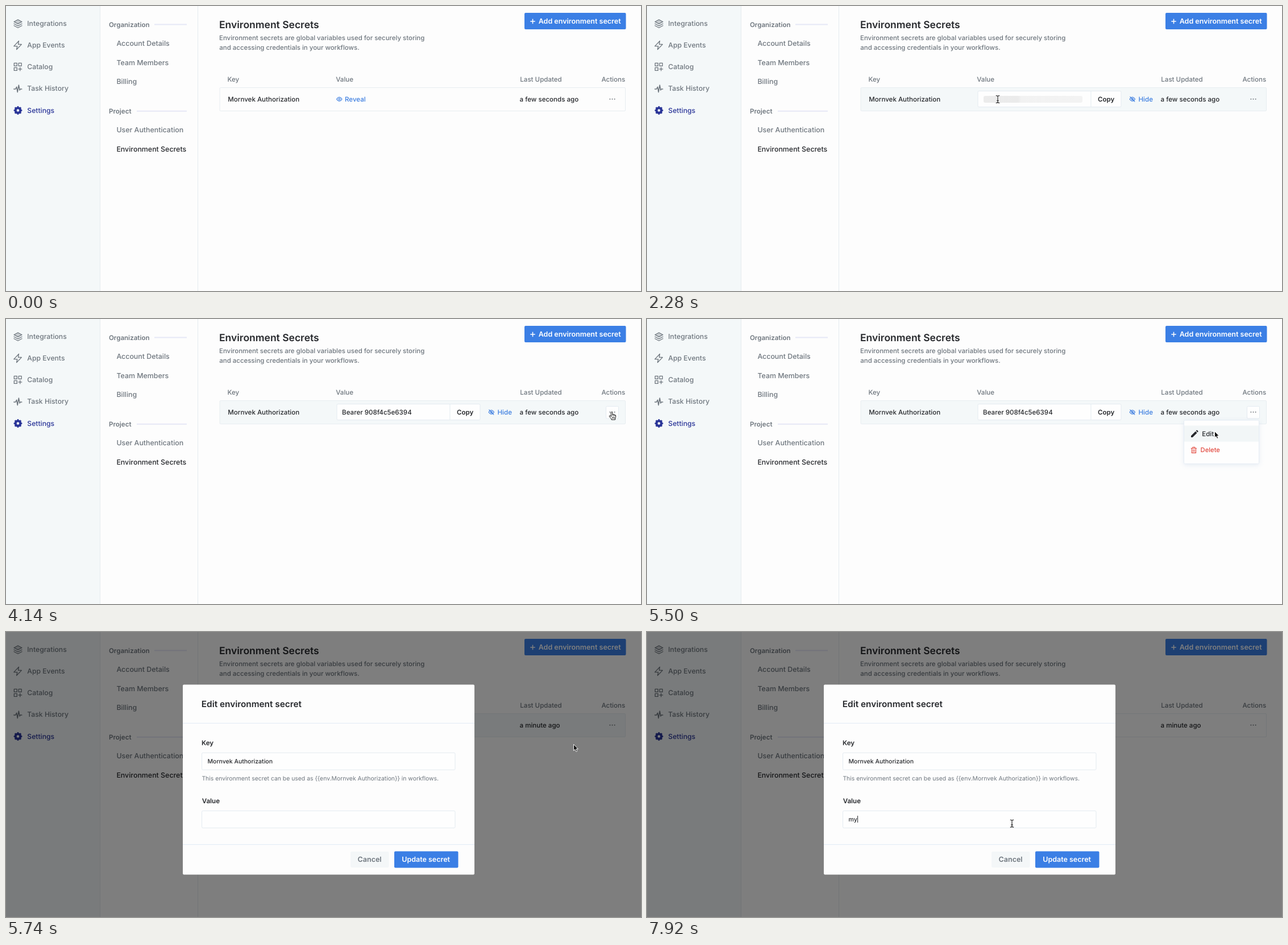
Recreate the animation shown at these times as an HTML page. Size 1117x501 px, loop 8000 ms.

```html
<!DOCTYPE html>
<html lang="en">
<head>
<meta charset="utf-8">
<title>Environment secrets</title>
<style>
  html, body { margin: 0; width: 100%; height: 100%; overflow: hidden; background: #fdfdfd; }
  svg { display: block; }
  text { font: 500 11.55px Inter, sans-serif; fill: #26282c; text-rendering: geometricPrecision; white-space: pre; }
  .side text { font-size: 12.2px; fill: #6e767e; }
  .nav text { font-size: 12.4px; fill: #6e767e; }
  .side .active { fill: #2a3598; }
  .nav .active { fill: #26282c; }
  .nav .section { font-size: 11.55px; font-weight: 600; }
  .muted text { fill: #6e767e; }
  .desc text { font-size: 11.45px; }
  .title { font-size: 17.5px; font-weight: 600; }
  .link { fill: #3b7de0; }
  .bold { font-weight: 600; }
  .button { font-size: 12.5px; font-weight: 600; fill: #fff; }
  .cancel { fill: #6e767e; }
  .danger { font-size: 11.2px; fill: #e2493f; }
  .heading { font-size: 15.35px; font-weight: 600; }
  .field { font-size: 10.5px; }
  .help { font-size: 10.4px; font-weight: 400; fill: #6e767e; }
  .icon { fill: none; stroke: #6e767e; stroke-width: 1.3; stroke-linejoin: round; stroke-linecap: round; }
  .blue { stroke: #3b7de0; stroke-width: 1.1; }
  .red { stroke: #e2493f; stroke-width: 1.1; }
  .box { fill: #fefefe; stroke: #e4ebf1; }
  .primary { fill: #3b7fe5; }
  #menu { transform-origin: 1010px 178px; }
  #menuPanel { filter: drop-shadow(0 2px 4px #b9cbe455); }
  #modal { transform-origin: 567px 259px; }
  #rowGlow { mix-blend-mode: plus-lighter; }
</style>
</head>
<body>
<svg width="1117" height="501" viewBox="0 0 1117 501">
  <defs>
    <linearGradient id="shimmer">
      <stop offset="0" stop-color="#ececec"/><stop offset=".35" stop-color="#ebebeb"/>
      <stop offset=".38" stop-color="#f2f2f2"/><stop offset="1" stop-color="#f3f3f3"/>
    </linearGradient>
    <path id="eye" d="M-4.7 0Q0 -7 4.7 0Q0 7 -4.7 0Z"/>
    <path id="beamShape" d="M-2.8 -6.4Q0 -6.4 0 -4.8V4.8Q0 6.4 -2.8 6.4M2.8 -6.4Q0 -6.4 0 -4.8M0 4.8Q0 6.4 2.8 6.4M-1.5 2.3H1.5"/>
  </defs>

  <rect width="1117" height="501" fill="#fdfdfd"/>
  <rect width="165" height="501" fill="#f4f8f9"/>
  <path d="M165.5 0V501M337.5 0V501" stroke="#e5ebef"/>

  <g class="side">
    <g class="icon">
      <path d="M21 24L28 27.7L21 31.4L14 27.7Z" fill="#c9ced2"/>
      <path d="M14 31.2L21 34.9L28 31.2M14 34.5L21 38.2L28 34.5"/>
      <path d="M22.5 61.5L13.8 70.6H19.8L18.6 76.5L27.4 67.4H21.5Z"/>
      <path d="M14.3 100.3h5v5h-5zM22.2 100.3h5v5h-5zM14.3 108.4h5v5h-5zM24.8 108v5.8M21.9 110.9h5.8"/>
      <path d="M13.8 146H16.8L18.7 142.2L20.2 151.5L22.4 139L24.1 148L25.2 146H27.8" stroke-width="1.5"/>
    </g>
    <g fill="none" stroke="#2a3598">
      <circle cx="21" cy="183.5" r="4.3" stroke-width="4"/>
      <circle cx="21" cy="183.5" r="6.3" stroke-width="2.2" pathLength="16" stroke-dasharray="1" stroke-dashoffset=".5"/>
    </g>
    <text x="37.3" y="35.4">Integrations</text>
    <text x="37.3" y="73.4">App Events</text>
    <text x="37.3" y="111.4">Catalog</text>
    <text x="37.3" y="149.4">Task History</text>
    <text x="37.3" y="187.6" class="active">Settings</text>
  </g>

  <g class="nav">
    <path d="M261 32.5H318M230 184.7H318" stroke="#e6e8f6" stroke-width="2"/>
    <text x="181" y="36.6" class="section">Organization</text>
    <text x="194.4" y="70.4">Account Details</text>
    <text x="194.4" y="103.7">Team Members</text>
    <text x="194.4" y="137">Billing</text>
    <text x="181" y="188.9" class="section">Project</text>
    <text x="194.4" y="222.4">User Authentication</text>
    <text x="194.4" y="255.8" class="active">Environment Secrets</text>
  </g>

  <text x="375" y="38.6" class="title">Environment Secrets</text>
  <g class="muted desc">
    <text x="375" y="60.4">Environment secrets are global variables used for securely storing</text>
    <text x="375.3" y="77.3">and accessing credentials in your workflows.</text>
  </g>
  <rect x="912" y="12" width="178.5" height="29" rx="2" class="primary"/>
  <path d="M922.3 27H930.7M926.5 22.8V31.2" stroke="#fff" stroke-width="1.5"/>
  <text x="936.7" y="31.3" class="button">Add environment secret</text>

  <g class="muted">
    <text x="389.5" y="132.6">Key</text>
    <text x="580.3" y="132.6">Value</text>
    <text x="904.3" y="132.6">Last Updated</text>
    <text x="1047.4" y="132.6">Actions</text>
  </g>

  <rect id="row" x="376" y="143.5" width="713.5" height="41" rx="1.5" stroke="#e8edf1"/>
  <text x="390.3" y="168">Mornvek Authorization</text>
  <text id="updated" x="903.5" y="168"></text>
  <rect id="actionBox" x="1055.5" y="153.5" width="22" height="21.5" rx="2" class="box"/>
  <path d="M1062.4 163.6h.01M1066.5 163.6h.01M1070.6 163.6h.01" stroke="#5c6268" stroke-width="1.9" stroke-linecap="round"/>

  <g id="closed">
    <g class="icon blue" transform="translate(586.3 163.8)"><use href="#eye"/><circle r="1.5"/></g>
    <text x="596" y="168" class="link">Reveal</text>
  </g>
  <g id="opened">
    <rect x="582" y="149.5" width="252" height="28" rx="2" class="box"/>
    <path d="M780.9 149.5V177.5" stroke="#e4ebf1"/>
    <rect id="skeleton" x="592" y="158" width="174" height="12" rx="3" fill="url(#shimmer)"/>
    <text id="secret" x="591.1" y="168">Bearer 908f4c5e6394</text>
    <text x="793" y="168" class="bold">Copy</text>
    <g class="icon blue" transform="translate(853.8 163.8)"><use href="#eye"/><circle r="1.5"/><path d="M-4 -4.2L4 4.2"/></g>
    <text x="864.5" y="168" class="link">Hide</text>
  </g>

  <g id="menu">
    <rect id="menuPanel" x="944.5" y="178" width="132" height="76.5" rx="2" fill="#fefefe" stroke="#e6edf5"/>
    <rect id="editRow" x="945" y="187.5" width="131" height="28" fill="#f2f6f7"/>
    <path d="M957 208V205.2L964.8 197.4L967.6 200.2L959.8 208ZM965.6 196.6L966.7 195.5Q967.3 195 967.9 195.5L969.4 197Q969.9 197.6 969.4 198.2L968.3 199.3Z" fill="#26282c"/>
    <text x="976.2" y="206">Edit</text>
    <path class="icon red" d="M957.2 227.3H966.6M960 227.2V225.3H963.8V227.2M958.3 227.5V235.4H965.5V227.5M960.7 229.6V233.2M963.1 229.6V233.2"/>
    <text x="973.6" y="234.4" class="danger">Delete</text>
  </g>

  <rect id="shade" width="1117" height="501"/>
  <rect id="rowGlow" x="376" y="144" width="458" height="40" fill="#0a0a0a"/>

  <g id="modal">
    <rect x="311" y="92.5" width="513" height="334" rx="2" fill="#fdfdfd"/>
    <path d="M311 160.3H824M311 373.6H824" stroke="#e0eaf5"/>
    <text x="343.8" y="131.8" class="heading">Edit environment secret</text>
    <text x="344" y="199.4" class="bold">Key</text>
    <rect x="344.5" y="212.3" width="445.5" height="30" rx="2" class="box"/>
    <text x="354.5" y="231" class="field">Mornvek Authorization</text>
    <text x="344.4" y="261" class="help">This environment secret can be used as {{env.Mornvek Authorization}} in workflows.</text>
    <text x="344.7" y="301.4" class="bold">Value</text>
    <rect x="344.5" y="314.4" width="445.5" height="30" rx="2" class="box"/>
    <text id="typed" x="354.5" y="333" class="field"></text>
    <rect id="caret" y="323" width="1" height="12" fill="#26282c"/>
    <rect x="606" y="386" width="67.5" height="28" rx="2" fill="#f4f7f8"/>
    <text x="618.6" y="404.4" class="button cancel">Cancel</text>
    <rect x="683" y="385.5" width="112.5" height="29" rx="2" class="primary"/>
    <text x="696.2" y="404.4" class="button">Update secret</text>
  </g>

  <g id="cursor">
    <path id="arrow" d="M0 0V11L2.5 8.8L4.2 12.8L6.2 12L4.5 8.1H7.8Z" fill="#111" stroke="#fff" stroke-width=".9"/>
    <g id="hand" fill="#fff" stroke="#111" stroke-width="1" stroke-linejoin="round" stroke-linecap="round">
      <path d="M-1.3 1.4Q-1.2 .3 0 .3Q1.2 .3 1.3 1.4V4.8Q2.6 4 3.5 5.2Q4.8 4.6 5.6 5.8Q7.2 5.7 7.2 7.3Q7.3 10 6.1 11.8V14H-.6V12.6Q-2 11.4 -4.2 8.2Q-4.6 7.2 -3.6 6.8Q-2.8 6.6 -1.3 8.3Z"/>
      <path d="M1.3 4.8V7M3.5 5.2V7.2M5.6 5.8V7.4M1 9.2V11.8M2.9 9.2V11.8M4.7 9.2V11.8" stroke-width=".8"/>
    </g>
    <g id="beam" fill="none" stroke-linecap="round">
      <use href="#beamShape" stroke="#fff" stroke-width="2.4"/>
      <use href="#beamShape" stroke="#1a1a1a" stroke-width="1.1"/>
    </g>
  </g>
</svg>
<script>
  const LOOP = 8000;
  const REVEALED = 1540, LOADED = 2360, ON_ACTION = 4050, MENU = 4500;
  const LEAVE_ACTION = 4870, CLICKED = 5500, FADING = 5620, MODAL = 5740, SETTLED = 5940;

  // Pointer moves: time span, number of steps, then a quadratic curve.
  const moves = [
    { start: 470, end: 1270, steps: 10, path: [[733, 398], [645, 300], [617, 164]] },
    { start: 2280, end: 3080, steps: 10, path: [[617, 164], [700, 234], [827, 198]] },
    { start: 3170, end: 3960, steps: 10, path: [[827, 198], [940, 196], [1056, 161]] },
    { start: 4050, end: 4140, steps: 2, path: [[1056, 161], [1061, 162], [1065.5, 163]] },
    { start: 4870, end: 5230, steps: 5, path: [[1065.5, 163], [1030, 192], [998.5, 197.5]] },
    { start: 5940, end: 6690, steps: 9, path: [[998.5, 197.5], [800, 290], [642, 336.7]] },
  ];

  const el = {};
  document.querySelectorAll('[id]').forEach(node => el[node.id] = node);

  const show = (node, on) => node.style.display = on ? '' : 'none';
  const within = (v, low, high) => v >= low && v < high;
  const inside = ([x, y], left, top, right, bottom) => within(x, left, right) && within(y, top, bottom);
  const ease = p => p * p * (3 - 2 * p);

  function pointerAt(t) {
    const move = moves.filter(m => m.start <= t).pop();
    if (!move) return null;
    const { start, end, steps, path: [a, b, c] } = move;
    const last = steps - 1;
    const step = Math.min(last, Math.floor((t - start) / (end - start) * last + 0.01));
    const p = ease(step / last), q = 1 - p;
    return [0, 1].map(i => q * q * a[i] + 2 * p * q * b[i] + p * p * c[i]);
  }

  function pointerKind(t, at) {
    if (t >= MODAL) return inside(at, 344, 314, 790, 345) ? 'beam' : 'arrow';
    if (t >= CLICKED) return 'arrow';
    if (t >= LEAVE_ACTION) {
      return inside(at, 944, 187, 1077, 216) || inside(at, 1055, 153, 1078, 175) ? 'hand' : 'arrow';
    }
    if (t >= ON_ACTION) return 'hand';
    if (t >= REVEALED + 80) return inside(at, 582, 150, 780, 178) ? 'beam' : 'arrow';
    return inside(at, 581, 155, 634, 173) ? 'hand' : 'arrow';
  }

  function drawPointer(t, at) {
    show(el.cursor, at);
    if (!at) return;
    const kind = pointerKind(t, at);
    for (const name of ['arrow', 'hand', 'beam']) show(el[name], name === kind);
    el.cursor.setAttribute('transform', `translate(${at})`);
  }

  function drawRow(t, at) {
    const menuOpen = within(t, MENU, FADING);
    const hovered = at && t < FADING && inside(at, 376, 143, 1090, 185);
    const tinted = hovered || within(t, MENU, SETTLED);
    const open = within(t, REVEALED, FADING);
    el.row.setAttribute('fill', tinted ? '#f4f8f9' : '#fdfdfd');
    el.updated.textContent = t < FADING ? 'a few seconds ago' : 'a minute ago';
    show(el.closed, !open);
    show(el.opened, open);
    show(el.skeleton, t < LOADED);
    show(el.secret, t >= LOADED);
    show(el.actionBox, within(t, ON_ACTION, FADING));

    show(el.menu, menuOpen);
    show(el.editRow, at && inside(at, 944, 187, 1077, 216));
    const grow = Math.min(1, 0.35 + Math.floor((t - MENU) / 100) * 0.45);
    el.menu.style.opacity = grow;
    el.menu.style.transform = `scaleY(${0.8 + 0.2 * grow})`;
  }

  function drawModal(t) {
    const full = t >= MODAL, fading = within(t, FADING, MODAL);
    show(el.shade, full || fading);
    show(el.modal, full || fading);
    show(el.rowGlow, fading);
    el.shade.style.opacity = full ? 0.5 : 0.107;
    el.modal.style.opacity = full ? 1 : 0.05;
    el.modal.style.transform = full ? 'none' : 'scale(1.038)';

    el.typed.textContent = t >= 7920 ? 'my' : t >= 7620 ? 'm' : '';
    show(el.caret, within(t, 6960, 7410) || t >= 7620);
    el.caret.setAttribute('x', 354.9 + (full ? el.typed.getComputedTextLength() : 0));
  }

  function frame(now) {
    const t = now % LOOP;
    const at = pointerAt(t);
    drawRow(t, at);
    drawModal(t);
    drawPointer(t, at);
    requestAnimationFrame(frame);
  }
  frame(performance.now());
</script>
</body>
</html>
```
